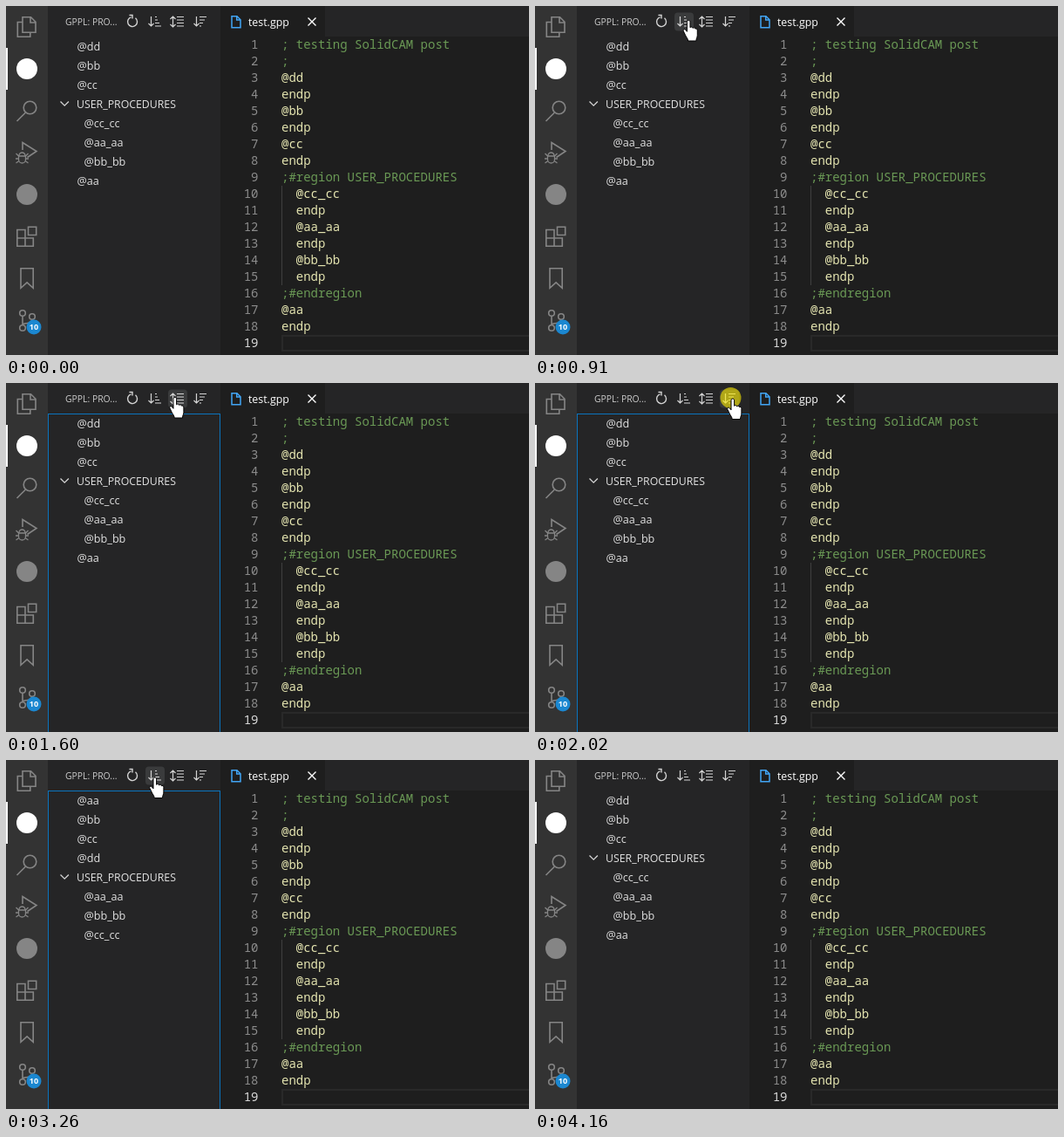
Recreate the animation shown at these times as an HTML page. Size 600 by 400 pixels, loop 4230 ms.

```html
<!DOCTYPE html>
<html>
<head>
<meta charset="utf-8">
<style>
html, body { margin: 0; width: 100%; height: 100%; overflow: hidden; background: #1e1e1e; }
svg { display: block; width: 600px; height: 400px; }
text { white-space: pre; }
.ui { font: 12.6px "Open Sans", "Noto Sans", sans-serif; fill: #e2e2e2; }
.ui .folder { font-size: 12.3px; }
.ui.title { font-size: 10.4px; fill: #ccc; }
.ui.tab { font-size: 12.4px; font-weight: 500; fill: #fff; }
.code { font: 500 14px "Noto Sans Mono", "DejaVu Sans Mono", monospace; fill: #e4e4b0; }
.code .note { fill: #6a9955; font-weight: 400; }
.num { text-anchor: end; fill: #8c8c8c; }
.num.now { fill: #dadada; }
.bar { fill: none; stroke: #858585; stroke-width: 1.6; }
.tool { fill: none; stroke: #d4d4d4; stroke-width: 1.2; }
</style>
</head>
<body>
<svg viewBox="0 0 600 400">
  <rect width="600" height="400" fill="#1e1e1e"/>
  <rect width="48" height="400" fill="#333"/>
  <rect x="48" width="198" height="400" fill="#252526"/>
  <rect x="366" width="234" height="35" fill="#252526"/>

  <!-- activity bar -->
  <rect y="48" width="2" height="48" fill="#fff"/>
  <g class="bar">
    <path d="M19 12.8h9.500l5.500 5.500v12h-15zM28 13v6h6M18.500 18.500h-5.200v16.700h14.500v-4.500"/>
    <circle cx="27.500" cy="116.500" r="7.300"/>
    <path d="M22.300 122.300L12.500 132"/>
    <path d="M19 165v-8.500l16 10-10.500 7"/>
    <path d="M15 171.500a3.500 3.500 0 0 1 7 0M14.500 172h8v4a4 4 0 0 1-8 0zM11.500 169l3 3M25.500 169l-3 3M11 175h3.500M22.500 175H26M11.500 180l3.500-2.500M25.500 180l-3.500-2.500" stroke-width="1.300"/>
    <path d="M12.800 256.500h9.200v18.700h-9.200zM12.800 266h18.500v9.200H22M25.500 253.300h9.200v9.200h-9.200z"/>
    <path d="M17 300.800h14.200v22.500l-7.100-6.500-7.100 6.500z"/>
    <circle cx="19" cy="352" r="3.300"/>
    <circle cx="30" cy="356" r="3.300"/>
    <circle cx="19" cy="369" r="3.300"/>
    <path d="M19 355.300v10.400M30 359.300c0 4-4 4.200-7 4.500s-4 1-4 2"/>
  </g>
  <circle cx="24" cy="72" r="12" fill="#fff"/>
  <circle cx="24" cy="216" r="12" fill="#858585"/>
  <circle cx="32" cy="368" r="8.500" fill="#1b87d0"/>
  <text x="32" y="371.300" text-anchor="middle" font-family="Open Sans, sans-serif" font-size="9" font-weight="700" fill="#fff">10</text>

  <!-- panel header -->
  <rect id="hover" y="7.500" width="22" height="21" rx="4" fill="#3a3b3c"/>
  <text class="ui title" x="68" y="22">GPPL: PRO...</text>
  <g class="tool">
    <path d="M148.500 13.800a5.500 5.500 0 1 1-5-1M141.500 10.500h3.500v4" stroke-width="1.400"/>
    <path d="M166.500 12v11M163.500 20l3 3 3-3M171 12.500h2M171 16h3M171 19.500h5M171 23h7"/>
    <path d="M191.500 12v12M188.500 15l3-3 3 3M188.500 21l3 3 3-3M196 12.500h8M196 16h8M196 19.500h8M196 23h8"/>
    <path d="M218.500 12v11M215.500 20l3 3 3-3M222 12.500h8M222 16h6M222 19.500h4M222 23h2"/>
  </g>

  <!-- tree -->
  <g id="tree" class="ui"></g>
  <path id="chevron" d="M62.500 -2.500l4.700 4.700 4.700-4.700" fill="none" stroke="#d4d4d4" stroke-width="1.300"/>
  <rect id="guide" x="64" y="123" width="1" height="66" fill="#3c3c3c"/>
  <rect id="focus" x="48.500" y="35.500" width="197" height="370" fill="none" stroke="#0b74bd"/>

  <!-- editor -->
  <path d="M259 11.700h6l4 4v9h-10zM264.700 12v4h4" fill="none" stroke="#42a5f5" stroke-width="1.500"/>
  <text class="ui tab" x="278" y="22.500">test.gpp</text>
  <path d="M346.500 13.500l9 9M355.500 13.500l-9 9" stroke="#fff" stroke-width="1.400"/>
  <rect x="317" y="378" width="290" height="17" fill="none" stroke="#292929" stroke-width="2"/>
  <rect x="316" y="206" width="1" height="114" fill="#404040"/>
  <g id="code" class="code"></g>

  <!-- pointer -->
  <circle id="ring" r="12" fill="#ffee00" fill-opacity=".6"/>
  <g id="pointer" fill="#fff" stroke="#000" stroke-linejoin="round">
    <path id="arrow" d="M0 0v17l4-3.700 2.800 6.500 2.700-1.200-2.800-6.300h5.800z"/>
    <path id="hand" d="M-2 1.800c0-2.400 3.600-2.400 3.600 0v6.500c.7-1.200 2.700-1 3 .6.800-1 2.600-.6 2.900.8.800-.7 2.400 0 2.400 1.800v5.500c0 2.500-1.400 3.500-1.400 6.500H-.8c0-2.500-1.900-4-3-6.500l-2.200-4.500c-.9-2 1-3.200 2.300-1.700l1.700 2z"/>
  </g>
</svg>
<script>
const $ = id => document.getElementById(id);
const show = (id, on) => $(id).setAttribute('visibility', on ? 'visible' : 'hidden');

function addText(parent, x, y, text, cls = '') {
  const el = document.createElementNS('http://www.w3.org/2000/svg', 'text');
  el.setAttribute('x', x);
  el.setAttribute('y', y);
  el.setAttribute('class', cls);
  el.textContent = text;
  return parent.appendChild(el);
}

const lines = `; testing SolidCAM post
;
@dd
endp
@bb
endp
@cc
endp
;#region USER_PROCEDURES
  @cc_cc
  endp
  @aa_aa
  endp
  @bb_bb
  endp
;#endregion
@aa
endp
`.split('\n');
lines.forEach((line, i) => {
  const y = 49 + 19 * i;
  addText($('code'), 289.5, y, i + 1, i === 18 ? 'num now' : 'num');
  addText($('code'), 316, y, line, line[0] === ';' ? 'note' : '');
});

const FOLDER = 'USER_PROCEDURES';
const orders = {
  line: ['@dd', '@bb', '@cc', FOLDER, '@cc_cc', '@aa_aa', '@bb_bb', '@aa'],
  up: ['@aa', '@bb', '@cc', '@dd', FOLDER, '@aa_aa', '@bb_bb', '@cc_cc'],
  down: [FOLDER, '@cc_cc', '@bb_bb', '@aa_aa', '@dd', '@cc', '@bb', '@aa']
};
const items = {};
for (const name of orders.line) {
  const isFolder = name === FOLDER;
  const x = isFolder ? 81 : name.includes('_') ? 89.5 : 81.5;
  items[name] = addText($('tree'), x, 0, name, isFolder ? 'folder' : '');
}

// Ring appears at the first value; the list is reordered one tick later.
const clicks = [
  [980, 'up'], [1460, 'line'], [2020, 'down'],
  [2430, 'line'], [3120, 'up'], [3610, 'line']
];
// time, x, y of the pointer tip
const path = [
  [280, 208, 372], [420, 204, 226], [490, 182, 30], [630, 176, 19], [770, 175.5, 16.5],
  [1320, 179, 16.5], [1460, 194, 16.5], [1600, 194, 16.5], [1810, 225, 17],
  [1950, 227, 18], [2160, 227, 18], [2300, 196.5, 17], [2710, 196.5, 17.5],
  [2910, 174, 18.5], [3120, 171, 20], [3260, 171, 20], [3470, 196, 17],
  [3750, 197, 16], [3820, 206, 25], [3890, 224, 221]
];
const LOOP = 4230, TICK = 70;
const starts = [0, 1320, 2430, 2770, 4160];

function tipAt(t) {
  const next = path.findIndex(p => p[0] > t);
  if (next < 0) return path[path.length - 1].slice(1);
  const a = path[Math.max(0, next - 1)], b = path[next];
  const k = Math.max(0, (t - a[0]) / (b[0] - a[0]));
  return [a[1] + (b[1] - a[1]) * k, a[2] + (b[2] - a[2]) * k];
}

function draw(now) {
  const ms = now % LOOP;
  const start = starts.filter(s => s <= ms).pop();
  const t = start + Math.floor((ms - start) / TICK) * TICK;

  const done = clicks.filter(c => t >= c[0] + TICK).pop();
  const order = orders[done ? done[1] : 'line'];
  order.forEach((name, i) => items[name].setAttribute('y', 50.5 + 22 * i));
  $('chevron').setAttribute('transform', `translate(0 ${46 + 22 * order.indexOf(FOLDER)})`);

  const [x, y] = tipAt(t);
  const visible = t >= 280 && t < 3960;
  const inBar = visible && y < 35;
  show('pointer', visible);
  show('arrow', visible && !inBar);
  show('hand', inBar);
  $('pointer').setAttribute('transform', `translate(${x} ${y})`);

  const button = Math.max(0, Math.min(2, Math.round((x - 171) / 26)));
  show('hover', inBar);
  $('hover').setAttribute('x', 160 + 26 * button);

  show('ring', clicks.some(c => t >= c[0] && t < c[0] + 2 * TICK));
  $('ring').setAttribute('transform', `translate(${x - 2.5} ${y - 1})`);

  show('guide', t >= 140 && t < 4160 && !inBar);
  show('focus', t >= 1050 && t < 4160);
}

function loop(now) {
  draw(now);
  requestAnimationFrame(loop);
}
draw(0);
requestAnimationFrame(loop);
</script>
</body>
</html>
```
